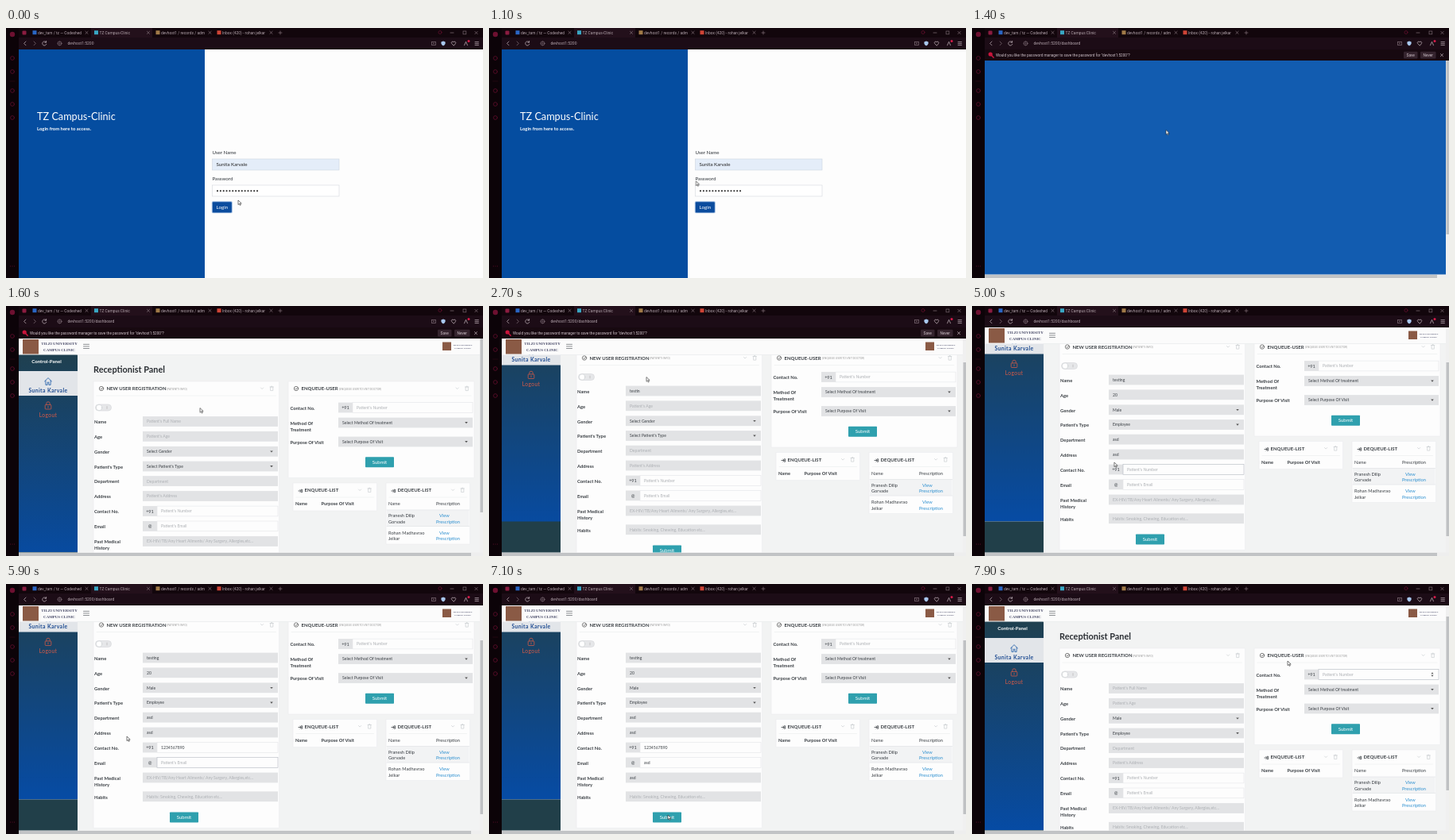
An HTML page that plays this animation: 600 px wide and 315 px high, repeating every 8000 ms.

```html
<!DOCTYPE html>
<html lang="en">
<head>
<meta charset="utf-8">
<title>Clinic dashboard</title>
<style>
  html, body { margin: 0; width: 100%; height: 100%; overflow: hidden; background: #0c0308; }
  svg { display: block; width: 600px; height: 315px; font-family: Lato, sans-serif; }
  .ui { font-family: Roboto, sans-serif; }
  .serif { font-family: "Liberation Serif", serif; }
  .b { font-weight: 700; }
  .mid { text-anchor: middle; }
  .wide { letter-spacing: .4px; }
  .line { fill: none; stroke-width: .8; stroke-linecap: round; stroke-linejoin: round; }

  #cursor, #scroll, #thumb, #shift, #tail, #login, #loading, #bar { animation: 8s infinite step-end; }
  #cursor, #scroll, #thumb { animation-timing-function: ease-in-out; }
  #cursor { animation-name: cursor; }
  #scroll { animation-name: scroll; }
  #thumb { animation-name: thumb; }
  #shift { animation-name: shift; }
  #tail { animation-name: tail; }
  #login { animation-name: login; }
  #loading { animation-name: loading; }
  #bar { animation-name: bar; }

  @keyframes cursor {
    0% { transform: translate(292px, 217px); }
    6%, 12% { transform: translate(268px, 223px); }
    16.5%, 22% { transform: translate(244px, 128.5px); }
    26% { transform: translate(198px, 104px); }
    30%, 37% { transform: translate(198px, 89.5px); }
    40.5% { transform: translate(204px, 143px); }
    43.5% { transform: translate(204px, 162px); }
    46.2%, 48.7% { transform: translate(204.5px, 193px); }
    53% { transform: translate(200px, 180px); }
    58% { transform: translate(190px, 199px); }
    70%, 78% { transform: translate(152px, 192px); }
    88.5%, 91% { transform: translate(225px, 291px); }
    97.5%, 100% { transform: translate(397px, 97px); }
  }
  @keyframes scroll {
    0%, 23.1% { transform: translateY(0); }
    25.6%, 93.1% { transform: translateY(-38.5px); }
    96.2%, 100% { transform: translateY(0); }
  }
  @keyframes thumb {
    0%, 23.1% { transform: translateY(0); }
    25.6%, 93.1% { transform: translateY(30px); }
    96.2%, 100% { transform: translateY(0); }
  }
  @keyframes shift { 0% { transform: translateY(0); } 62.5%, 100% { transform: translateY(-14px); } }
  @keyframes tail { 0% { transform: translateY(0); } 62.5%, 100% { transform: translateY(14px); } }
  @keyframes login { 0% { visibility: visible; } 15.6%, 100% { visibility: hidden; } }
  @keyframes loading { 0% { visibility: visible; } 19.4%, 100% { visibility: hidden; } }
  @keyframes bar {
    0% { visibility: hidden; }
    15.6% { visibility: visible; }
    62.5%, 100% { visibility: hidden; }
  }
</style>
</head>
<body>
<svg id="stage" viewBox="0 0 600 315"></svg>
<script>
const LOOP = 8000;
const INK = '#3a3f44', HINT = '#adb0b4', FIELD = '#e2e3e5', EDGE = '#e3e5e8';
const DIM = '#76656e', LIT = '#b5a6ae', ROSE = '#5f0f2b';

const rect = (x, y, w, h, fill, more = '') =>
  `<rect x="${x}" y="${y}" width="${w}" height="${h}" fill="${fill}" ${more}/>`;
const text = (x, y, size, fill, str, cls = '', id = '') =>
  `<text x="${x}" y="${y}" font-size="${size}" fill="${fill}" class="${cls}"${id && ` id="${id}"`}>${str}</text>`;
const dot = (x, y, r, fill) => `<circle cx="${x}" cy="${y}" r="${r}" fill="${fill}"/>`;
const line = (d, color, width = .8) => `<path class="line" d="${d}" stroke="${color}" style="stroke-width:${width}"/>`;
const group = (id, body) => `<g id="${id}">${body}</g>`;
const cross = (x, y, color) => line(`M${x - 1.6} ${y - 1.6}l3.2 3.2m0-3.2l-3.2 3.2`, color);
const ring = (x, y, r, color) => `<circle class="line" cx="${x}" cy="${y}" r="${r}" stroke="${color}"/>`;
const edge = color => `stroke="${color}" stroke-width=".6"`;
const grad = (id, a, b) =>
  `<linearGradient id="${id}" x2="0" y2="1"><stop stop-color="${a}"/><stop offset="1" stop-color="${b}"/></linearGradient>`;

// form rows: id, label lines, y, kind, hint
const rows = [
  ['name', ['Name'], 145.5, 'input', "Patient's Full Name"],
  ['age', ['Age'], 164.3, 'input', "Patient's Age"],
  ['gender', ['Gender'], 183.3, 'select', 'Select Gender'],
  ['type', ["Patient's Type"], 202, 'select', "Select Patient's Type"],
  ['dept', ['Department'], 220.6, 'input', 'Department'],
  ['addr', ['Address'], 239.5, 'input', "Patient's Address"],
  ['phone', ['Contact No.'], 258.5, '+91', "Patient's Number"],
  ['email', ['Email'], 277.4, '@', "Patient's Email"],
  ['past', ['Past Medical', 'History'], 296.5, 'input', 'EX-HIV/TB/Any Heart Ailments/ Any Surgery, Allergies,etc...'],
  ['habits', ['Habits'], 320.3, 'input', 'Habits: Smoking, Chewing, Education etc...']
];
const lookup = [
  ['phone2', ['Contact No.'], 128, '+91', "Patient's Number"],
  ['method', ['Method Of', 'Treatment'], 147, 'select', 'Select Method Of treatment'],
  ['visit', ['Purpose Of Visit'], 171, 'select', 'Select Purpose Of Visit']
];

// typed values: id, text, first key, last key, cleared
const typed = [
  ['name', 'testing', 2200, 2780, 7300],
  ['age', '20', 2950, 3080, 7300],
  ['dept', 'asd', 4250, 4450, 7300],
  ['addr', 'asd', 4650, 4850, 7300],
  ['phone', '1234567890', 5050, 5600, 7300],
  ['email', 'asd', 6030, 6230, 7300],
  ['past', 'asd', 6400, 6700, 7300]
];
const picked = [['gender', 'Male', 3250], ['type', 'Employee', 3850]];
// outlined inputs with focus: id, from, to
const focus = [['phone', 4950, 5700], ['email', 5700, 6300], ['phone2', 7700, 8000]];

function field([id, labels, y, kind, hint], lx, x, w) {
  const prefix = kind === '+91' || kind === '@';
  const bx = prefix ? x + 18 : x;
  let out = labels.map((s, i) => text(lx, y + 2.7 + i * 8, 5.8, INK, s, 'b')).join('');
  if (prefix) {
    out += rect(x, y - 6.4, 18, 12.8, FIELD);
    out += text(x + 9, y + 2, 5.6, INK, kind, 'mid');
  }
  out += rect(bx, y - 6.4, w - (bx - x), 12.8, prefix ? '#fdfdfd' : FIELD, prefix ? `id="box-${id}" ${edge(EDGE)}` : '');
  out += text(bx + 5, y + 1.9, 5.1, kind === 'select' ? INK : HINT, hint, '', 'val-' + id);
  if (kind === 'select') out += `<path d="M${x + w - 9.8} ${y - .9}h3.6l-1.8 2.1z" fill="#555"/>`;
  return out;
}

function card(x, y, w, h, title, note = '', noteX = 0) {
  const cy = y + 9;
  const check = ring(x + 10, cy, 2.7, '#666') + line(`M${x + 8.8} ${cy}l1 1.1l1.8-2.2`, '#666');
  const arrow = line(`M${x + 7} ${cy + 1}h3.4m-1.5-1.5l1.5 1.5l-1.5 1.5m1.4-3.2h1.4v3.4h-1.4`, INK);
  return rect(x, y, w, h, '#fdfdfd', edge('#eaecee'))
    + (note ? check : arrow)
    + text(x + (note ? 16.5 : 14.5), cy + 2.2, 6, INK, title, 'b')
    + text(noteX, cy + 1.6, 3.2, '#999', note)
    + line(`M${x + w - 23} ${cy - 1}l1.6 1.6l1.6-1.6`, '#d0d3d6')
    + line(`M${x + w - 11.5} ${cy - 2}h4.4m-3.8 0v4.6h3.2v-4.6m-2.2 0v-.9h1.2v.9`, '#d0d3d6')
    + line(`M${x + 4} ${y + 18}h${w - 8}`, '#eff1f2');
}

const button = (x, y) => rect(x, y, 36, 13, '#2fa0ae', 'rx=".8"')
  + text(x + 18, y + 8.6, 6, '#fff', 'Submit', 'mid');

function sidebar() {
  return rect(16, 41, 74, 283, 'url(#nav)')
    + group('tail', rect(16, 310, 74, 90, '#213f49'))
    + text(51, 71.5, 6.1, '#fff', 'Control-Panel', 'mid b')
    + rect(16, 82, 74, 31, '#e2e5e9')
    + line('M48.5 95l4.5-4.4l4.5 4.4m-7.6-1v5.4h2.2v-3.2h1.8v3.2h2.2v-5.4', '#1c5ca8')
    + text(53, 108.5, 6.8, '#1f4c92', 'Sunita Karvale', 'mid b wide')
    + rect(49.2, 124.4, 7.6, 5.6, 'none', 'stroke="#cf5a48" stroke-width=".8" rx=".8"')
    + line('M50.8 124.4v-1.5a2.2 2.2 0 0 1 4.4 0v1.5m-2.2 2v1.6', '#cf5a48')
    + text(53, 139.8, 6.7, '#d85a46', 'Logout', 'mid wide');
}

function lists() {
  const person = (y, a, b) => text(481, y, 5.7, INK, a) + text(481, y + 7.6, 5.7, INK, b)
    + text(545, y, 5.7, '#2b8fd0', 'View') + text(541, y + 7.6, 5.7, '#2b8fd0', 'Prescription');
  return card(361, 223, 105.5, 35, 'ENQUEUE-LIST')
    + text(364, 251, 5.7, INK, 'Name', 'b') + text(396.5, 251, 5.7, INK, 'Purpose Of Visit', 'b')
    + card(478, 223, 105.5, 77, 'DEQUEUE-LIST')
    + text(481, 251, 5.7, INK, 'Name') + text(541, 251, 5.7, INK, 'Prescription')
    + rect(479, 257, 103.5, 20.5, '#f2f3f4')
    + line('M479 257h103.5M479 277.5h103.5', '#e4e6e9')
    + person(266, 'Pranesh Dilip', 'Gorvade') + person(287.6, 'Rohan Madhavrao', 'Jelkar');
}

function menu() {
  const items = ["Select Patient's Type", 'Employee', 'Family Member', 'Student', 'Visitor'];
  return rect(172, 208.8, 170, 66.5, '#ebecee', edge('#d4d7da')) + rect(173.5, 222.6, 166.5, 13, '#25282b')
    + items.map((s, i) => text(177, 218 + i * 13, 5.6, i === 1 ? '#fff' : '#222', s)).join('');
}

function dashboard() {
  const form = rows.map(r => field(r, 111, 172, 170)).join('');
  const queue = lookup.map(r => field(r, 357.5, 418, 169)).join('');
  const scroll = rect(16, 41, 584, 345, '#f2f3f3') + sidebar()
    + text(110, 83.6, 10.9, '#2a2e33', 'Receptionist Panel', 'b')
    + card(110, 95, 233.5, 265, 'NEW USER REGISTRATION', "(PATIENT'S INFO)", 202.5)
    + rect(112.5, 124, 20, 8, '#e6e7e9', `rx="4" ${edge('#d3d6d9')}`) + dot(117, 128, 3.7, '#fff')
    + line('M127 126.6v2.8', '#bbb') + ring(117, 128, 3.7, '#d0d3d6')
    + form + button(206, 340)
    + card(355, 95, 234, 121.5, 'ENQUEUE-USER', '(ENQUEUE USER TO VISIT DOCTOR)', 419)
    + queue + button(452, 190.3)
    + group('spin', '<path d="M577.5 127.3h3l-1.5-2zm0 1.4h3l-1.5 2z" fill="#555"/>')
    + lists() + group('menu', menu());
  const head = rect(16, 41, 580, 20.5, '#fbfbfb') + line('M90 61.5h506', '#e9ebed')
    + rect(21, 42, 20, 18.5, '#8a5a45')
    + text(67, 48.5, 4.9, '#4a4c6a', 'TILZI UNIVERSITY', 'mid serif b')
    + text(67, 57, 4.9, '#4a4c6a', 'CAMPUS CLINIC', 'mid serif b')
    + line('M97.5 48.3h7m-7 2.6h7m-7 2.6h7', '#8c8f93', 1)
    + rect(549, 45.5, 11, 10.5, '#8a5a45')
    + text(574.5, 49.6, 2.6, '#4a4c6a', 'TILZI UNIVERSITY', 'mid serif b')
    + text(574.5, 54, 2.6, '#4a4c6a', 'CAMPUS CLINIC', 'mid serif b');
  return group('shift', group('scroll', scroll) + head)
    + group('loading', rect(16, 41, 580, 270, '#125cb0'))
    + rect(596, 27, 4, 288, '#f0f0f0') + rect(596.5, 41, 3.5, 219, '#bfc1c3', 'id="thumb"')
    + rect(16, 310.5, 584, 4.5, '#eeeeee') + rect(16, 311, 569, 4, '#c1c3c5');
}

function login() {
  const dots = Array.from({ length: 14 }, (_, i) => dot(266 + i * 3.85, 205.2, 1.05, '#222')).join('');
  return rect(16, 27, 234, 288, '#054da0') + rect(250, 27, 350, 288, '#fdfdfd')
    + text(39, 115.6, 12.7, '#fff', 'TZ Campus-Clinic')
    + text(39, 128.8, 5.9, '#fff', 'Login from here to access.', 'b')
    + text(259.5, 159.4, 6.2, '#2f343a', 'User Name')
    + rect(259.5, 165, 159.5, 14, '#e4edf9', edge('#cdd5df'))
    + text(264.5, 174.2, 6.2, '#222', 'Sunita Karvale')
    + text(259.5, 192.2, 6.2, '#2f343a', 'Password')
    + rect(259.5, 198, 159.5, 14, '#fff', edge('#d3d7dc')) + dots
    + rect(258.8, 218.3, 26, 15, '#9dbbe0', 'rx="1.6"') + rect(259.8, 219.2, 24, 13.2, '#0b4c9e', 'rx="1"')
    + text(271.8, 228, 6.2, '#fff', 'Login', 'mid');
}

function chrome() {
  const tab = (x, color, title, id) => rect(x, 3.2, 5, 5, color)
    + text(x + 6.5, 7.8, 4.9, LIT, title, 'ui', id) + cross(x + 68, 5.8, DIM);
  return rect(0, 0, 600, 12, '#12060c') + rect(0, 0, 16, 315, '#0c0308')
    + rect(107, 0, 77, 13, '#23101b') + rect(16, 12, 584, 15, '#1c0c16')
    + dot(8, 8, 3.2, '#6d1030')
    + [38, 55, 79, 96, 113].map(y => ring(8, y, 2.4, ROSE)).join('')
    + line('M5 67h6', '#2a0814') + [5.5, 8, 10.5].map(x => dot(x, 300, .6, ROSE)).join('')
    + rect(20.5, 3.5, 5, 5, '#8b1c40', 'rx="1"')
    + tab(33.5, '#2a66c4', 'dev_tarn / tz — Codeshed') + tab(111, '#39a7c4', '', 'tab')
    + tab(188.5, '#a07a48', 'devhost1 / records / adm') + tab(265.5, '#cf4436', 'Inbox (420) - rohan jelkar')
    + line('M343 6h4m-2-2v4', DIM)
    + ring(546, 5.5, 2, ROSE) + line('M559 6h4', DIM) + rect(575, 4, 3.8, 3.8, 'none', `stroke="${DIM}" stroke-width=".7"`)
    + cross(591.5, 6, DIM)
    + line('M25 17l-2.4 2.4l2.4 2.4', LIT) + line('M35 17l2.4 2.4l-2.4 2.4', DIM)
    + line('M50.5 18a2.6 2.6 0 1 0 .3 2.4m-.2-4v1.8h-1.8', LIT)
    + ring(67.5, 19.4, 2.5, DIM) + line('M65 19.4h5m-2.5-2.5v5', DIM, .5)
    + text(77.5, 21.3, 5, LIT, '', 'ui', 'url')
    + rect(535.5, 17.4, 5, 4, 'none', `stroke="${DIM}" stroke-width=".8"`) + dot(538, 19.4, .8, DIM)
    + '<path d="M550 16.6l2.6 1v2.2q-.4 1.8-2.6 2.8q-2.2-1-2.6-2.8v-2.2z" fill="#a9c8ee"/>'
    + line('M563 22l-2.5-2.6a1.4 1.4 0 0 1 2.5-1.6a1.4 1.4 0 0 1 2.5 1.6z', LIT)
    + line('M576.5 21.8l2-4.5l2 4.5', LIT) + dot(582, 16.6, 1.5, '#d81b4a')
    + line('M590 17.6h4.4m-4.4 2h4.4m-4.4 2h4.4', LIT);
}

function saveBar() {
  const key = '#c9153b', ink = '#d0c3ca';
  const choice = (x, w, str) => rect(x, 29.8, w, 8.8, '#35242e', 'rx="1"')
    + text(x + w / 2, 35.9, 4.8, ink, str, 'ui mid');
  return rect(16, 27, 584, 14, '#170910')
    + dot(23.2, 33, 2.6, key) + line('M24.6 34.4l2.6 2.8', key, 1.5)
    + text(30, 36, 4.7, ink, 'Would you like the password manager to save the password for "devhost1:5200"?', 'ui')
    + choice(543, 17.5, 'Save') + choice(564, 19.5, 'Never')
    + cross(591, 34.2, LIT);
}

document.getElementById('stage').innerHTML =
  `<defs>${grad('nav', '#213f49', '#064ba4')}</defs>`
  + dashboard() + group('login', login()) + chrome() + group('bar', saveBar())
  + group('cursor', '<path d="M0 0v5.6l1.4-1.2l.9 2l1-.4l-.9-2h1.8z" fill="#fff" stroke="#222" stroke-width=".6"/>');

const $ = id => document.getElementById(id);
const show = (id, on) => $(id).setAttribute('visibility', on ? 'visible' : 'hidden');
const put = (el, str) => { if (el.textContent !== str) el.textContent = str; };
const hints = Object.fromEntries([...rows, ...lookup].map(r => [r[0], r[4]]));

function render(t) {
  for (const [id, str, from, to, clear] of typed) {
    const el = $('val-' + id);
    const step = (to - from) / (str.length - 1);
    const n = t < from || t >= clear ? 0 : Math.min(str.length, 1 + Math.floor((t - from) / step));
    put(el, n ? str.slice(0, n) : hints[id]);
    el.setAttribute('fill', n ? INK : HINT);
  }
  for (const [id, str, at] of picked) put($('val-' + id), t < at ? hints[id] : str);
  for (const id of ['phone', 'email', 'phone2']) {
    const on = focus.some(([who, from, to]) => who === id && t >= from && t < to);
    $('box-' + id).setAttribute('stroke', on ? '#b4bac1' : EDGE);
  }
  show('menu', t >= 3500 && t < 3850);
  show('spin', t >= 7700);
  const inside = t >= 1250;
  put($('tab'), inside ? 'TZ Campus Clinic' : 'TZ Campus-Clinic');
  put($('url'), inside ? 'devhost1:5200/dashboard' : 'devhost1:5200');
}

let start;
function tick(now) {
  start ??= now;
  render((now - start) % LOOP);
  requestAnimationFrame(tick);
}
render(0);
requestAnimationFrame(tick);
</script>
</body>
</html>
```
